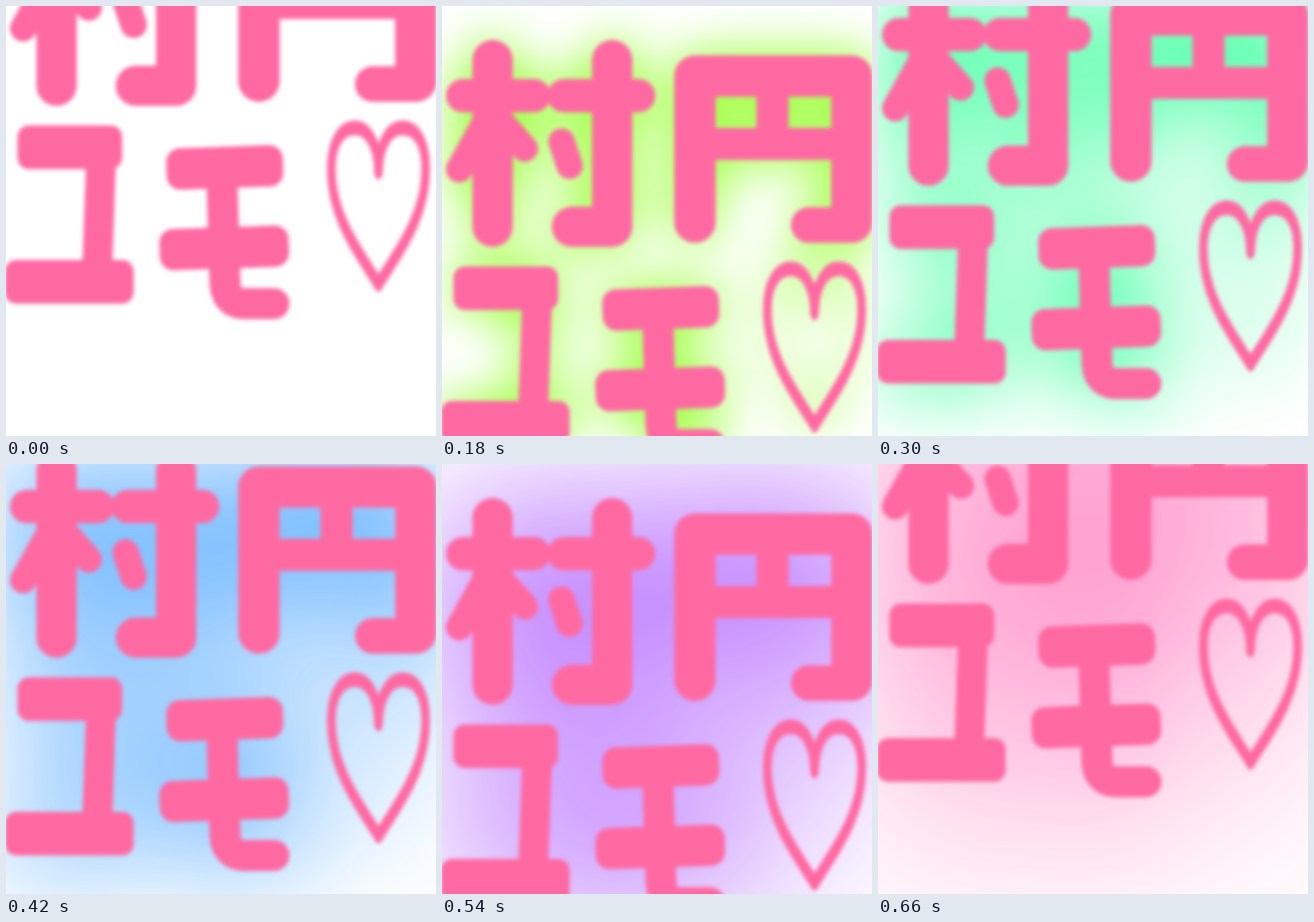
These frames come from a looping animation (748x748 px, 0.72 s). An HTML page:

```html
<!DOCTYPE html>
<html lang="ja">
<head>
<meta charset="utf-8">
<title>村円ユモ♡</title>
<style>
  html, body { margin: 0; width: 100%; height: 100%; overflow: hidden; background: #fff; }
  svg { display: block; width: 100vw; height: 100vh; }
  #word { fill: none; stroke: currentColor; stroke-linecap: round; stroke-linejoin: round; }
  #word .bar { fill: currentColor; stroke: none; }
</style>
</head>
<body>
<svg viewBox="0 0 748 748" role="img" aria-label="村円ユモ♡">
  <defs>
    <filter id="soft" filterUnits="userSpaceOnUse" x="-50" y="-300" width="850" height="1150" color-interpolation-filters="sRGB">
      <feGaussianBlur stdDeviation="3.8"/>
    </filter>
    <filter id="halo" filterUnits="userSpaceOnUse" x="-550" y="-850" width="1850" height="2250" color-interpolation-filters="sRGB">
      <feGaussianBlur id="spread" stdDeviation="1"/>
    </filter>
    <g id="word">
      <!-- 村 -->
      <path stroke-width="70" d="M88 94V384M296 94V384H226"/>
      <path stroke-width="58" d="M36 156H160M212 156H342"/>
      <path stroke-width="46" d="M82 190L30 284M98 196L144 248M208 236L222 278"/>
      <!-- 円 -->
      <path stroke-width="72" d="M440 376V122H713V376"/>
      <path stroke-width="62" d="M713 381H638"/>
      <path stroke-width="56" d="M575 122V238M440 240H713"/>
      <!-- ユ -->
      <rect class="bar" x="20" y="453" width="182" height="76" rx="20"/>
      <rect class="bar" x="-2" y="687" width="224" height="76" rx="20"/>
      <path stroke-width="52" d="M166 494L158 722"/>
      <!-- モ -->
      <rect class="bar" x="279" y="490" width="203" height="72" rx="24" transform="rotate(-2 380 525)"/>
      <rect class="bar" x="267" y="630" width="225" height="72" rx="24" transform="rotate(-2 380 665)"/>
      <path stroke-width="54" d="M375 526L381 728Q383 763 416 763H466"/>
      <!-- ♡ -->
      <path stroke-width="15" transform="scale(1 1.7)" d="M648 429C612 394 566 360 566 311C566 283 584 269 607 269C631 269 647 287 648 314C649 287 665 269 690 269C713 269 730 283 730 311C730 360 684 394 648 429Z"/>
    </g>
  </defs>
  <g id="glow" filter="url(#halo)" opacity=".88"><use class="move" href="#word"/></g>
  <g color="#ff69a2" filter="url(#soft)"><use class="move" href="#word"/></g>
</svg>
<script>
  const STEP = 60, COUNT = 12, GRAVITY = 36.7, SPREAD = 15;
  const $ = id => document.getElementById(id);
  const glow = $('glow'), spread = $('spread');
  const movers = document.querySelectorAll('.move');

  // Height of a jump that takes off at step a and lands at step b.
  const jump = (k, a, b) => Math.max(0, GRAVITY * (k - a) * (b - k));
  const height = k => jump(k, 3.94, 7.73) + jump(k < 6 ? k + COUNT : k, 9.39, 14.56);

  // The glow runs once round the colour wheel while it spreads.
  function draw(k) {
    for (const m of movers) m.setAttribute('transform', `translate(0 ${-height(k)})`);
    glow.setAttribute('display', k ? 'inline' : 'none');
    glow.setAttribute('color', `hsl(${k * 360 / COUNT} 100% 50%)`);
    spread.setAttribute('stdDeviation', Math.max(1, k * SPREAD));
  }

  let start, last = 0;
  function tick(now) {
    start ??= now;
    const k = Math.floor((now - start) / STEP) % COUNT;
    if (k !== last) draw(last = k);
    requestAnimationFrame(tick);
  }
  draw(0);
  requestAnimationFrame(tick);
</script>
</body>
</html>
```
